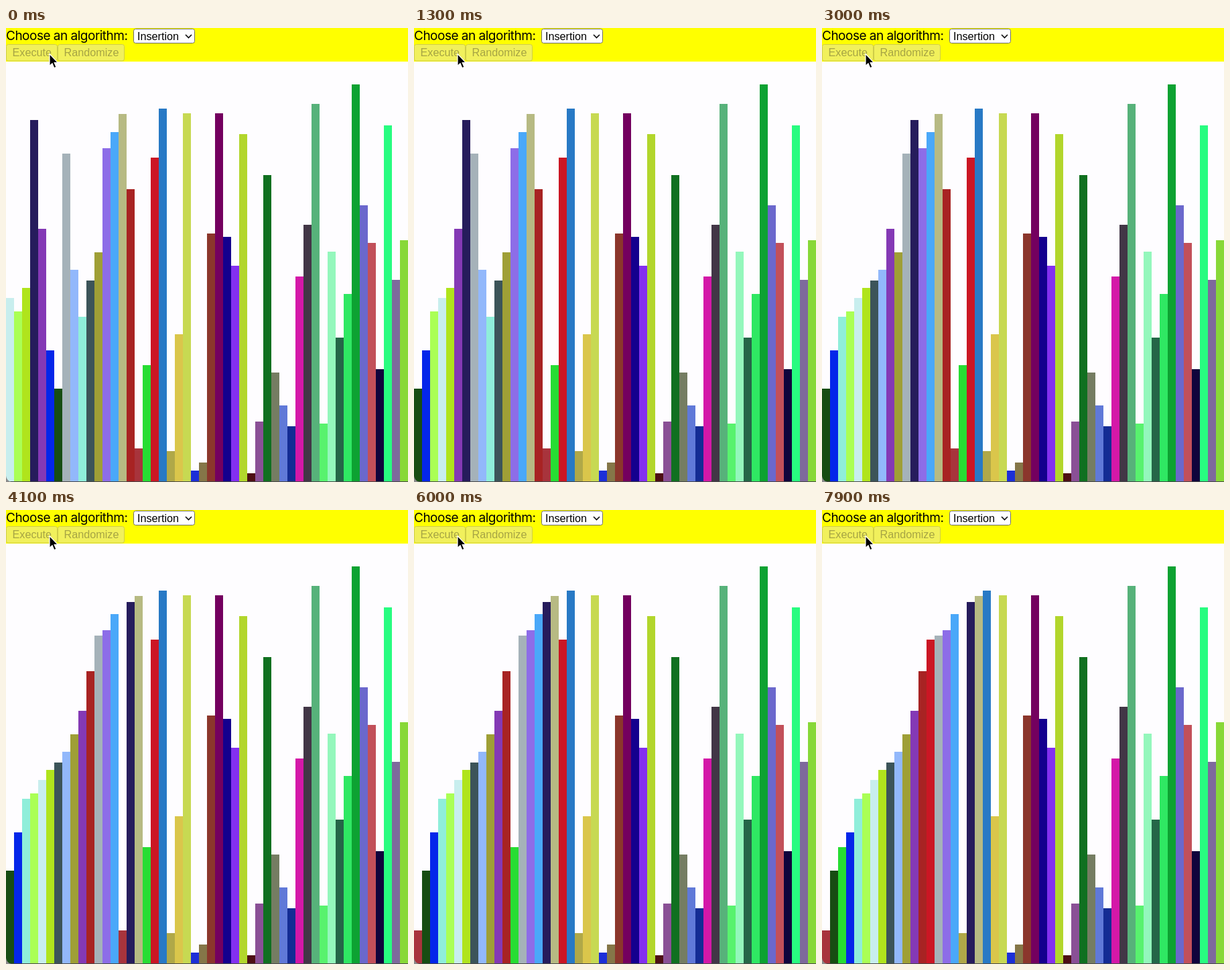
These frames come from a looping animation (600x676 px, 8 s). An HTML page:

```html
<!DOCTYPE html>
<html lang="en">
<head>
<meta charset="utf-8">
<title>Insertion sort</title>
<style>
  html, body { margin: 0; width: 100%; height: 100%; overflow: hidden; background: #fefdff; }
  svg { display: block; width: 600px; height: 676px; }
  .label { font: 19px Inter, sans-serif; letter-spacing: -0.5px; }
  .control { font: 16.2px "Liberation Sans", Arial, sans-serif; }
  .disabled rect { fill: #f1f05c; stroke: #cfcd48; }
  .disabled text { fill: #a6a444; }
</style>
</head>
<body>
<svg viewBox="0 0 600 676">
  <rect width="600" height="676" fill="#fefdff"/>
  <rect width="600" height="50" fill="#ff0"/>
  <text class="label" x="0" y="18">Choose an algorithm:</text>
  <rect x="190.5" y="1.5" width="91" height="21" rx="3" fill="#fff" stroke="#6c6c6c"/>
  <text class="control" x="196" y="18">Insertion</text>
  <path d="M268 10l4.5 4.5 4.5-4.5" fill="none" stroke="#111" stroke-width="1.7"/>
  <g class="control disabled">
    <rect x="0.5" y="24.5" width="76" height="24.5" rx="3"/>
    <text x="9.5" y="42">Execute</text>
    <rect x="77.5" y="24.5" width="99" height="24.5" rx="3"/>
    <text x="86.5" y="42">Randomize</text>
  </g>
  <g id="bars" shape-rendering="crispEdges"></g>
  <rect y="675" width="600" height="1" fill="#4a4a4a"/>
  <path d="M0 667Q1 674 8 676H0Z" fill="#8b8b8b"/>
  <path d="M65 38.5V56.5L69 52.8L71.8 59.5L75 58.2L72.2 51.7H77.3Z" fill="#000" stroke="#fff" stroke-width="1.2"/>
</svg>
<script>
const LOOP = 8000, FRAME = 100, SWAP_MS = 102.7, PHASE = 0.93;
const BAR = 12, FLOOR = 675;

const tops = [
  402, 422, 387, 137, 299, 480, 537, 187, 360, 430,
  376, 334, 179, 155, 128, 240, 626, 502, 193, 120,
  630, 456, 127, 659, 647, 306, 127, 311, 354, 158,
  663, 586, 219, 513, 562, 593, 370, 293, 113, 589,
  333, 461, 396, 84, 264, 320, 508, 145, 375, 316
];
const colors = `
  c8eeee aaff55 b0e41c 261c5c 8439b5 0426ea 174d12 a5b2b9 92b8fb 8feeda
  3c5459 9f9f36 8d6de8 4aa8f9 b7ba83 a82323 a8343c 27dd33 cb1624 2879c5
  b0a848 dac64b c7d952 1c2fd8 857648 8b362c 74005f 14008e 8330f0 b2d62c
  4d0f14 8a5096 107020 757d62 6079d8 142c94 d418a8 423646 57b27a 58f26e
  94f7bc 256648 2fe863 0da232 6b68cc c2505a 10043c 28fc80 7e6a9c 88d838
`.trim().split(/\s+/);

const group = document.getElementById("bars");
const bars = tops.map((top, i) => {
  const rect = document.createElementNS("http://www.w3.org/2000/svg", "rect");
  rect.setAttribute("y", top);
  rect.setAttribute("width", BAR);
  rect.setAttribute("height", FLOOR - top);
  rect.setAttribute("fill", "#" + colors[i]);
  return group.appendChild(rect);
});

// Order of the bars after a given number of insertion sort swaps.
function orderAfter(swaps) {
  const order = tops.map((_, i) => i);
  for (let i = 1; i < order.length; i++) {
    for (let j = i; j > 0 && tops[order[j]] > tops[order[j - 1]]; j--) {
      if (swaps-- <= 0) return order;
      [order[j], order[j - 1]] = [order[j - 1], order[j]];
    }
  }
  return order;
}

function swapsAt(time) {
  const t = Math.floor(time / FRAME) * FRAME;
  return t < 2 * FRAME ? 0 : Math.floor(t / SWAP_MS + PHASE);
}

let shown = -1;
function draw(time) {
  const swaps = swapsAt(time % LOOP);
  if (swaps === shown) return;
  shown = swaps;
  orderAfter(swaps).forEach((id, slot) => bars[id].setAttribute("x", slot * BAR));
}

const start = performance.now();
function tick() {
  draw(performance.now() - start);
  requestAnimationFrame(tick);
}
tick();
</script>
</body>
</html>
```
